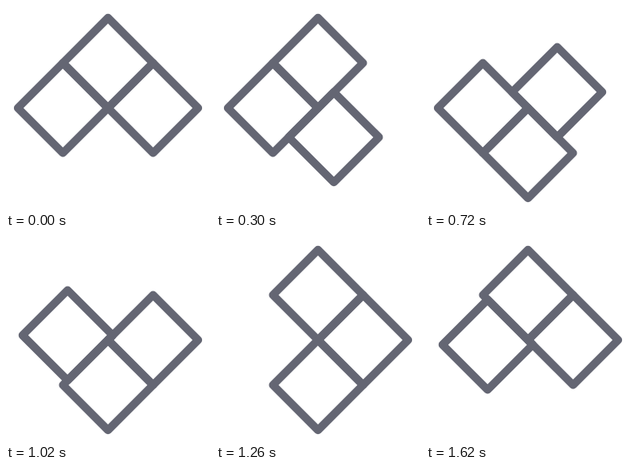
An HTML page that plays this animation: 256x256 px, repeating every 1.68 s.

```html
<!DOCTYPE html>
<html lang="en">
<head>
<meta charset="utf-8">
<title>Sliding squares</title>
<style>
  html, body { margin: 0; width: 100%; height: 100%; overflow: hidden; background: #fff; }
  svg { display: block; width: 100%; height: 100%; }
  rect { fill: none; stroke: #646673; stroke-width: 10; stroke-linejoin: round; }
</style>
</head>
<body>
<svg viewBox="0 0 256 256">
  <g transform="translate(128 128) rotate(45)">
    <rect width="80" height="80"/>
    <rect width="80" height="80"/>
    <rect width="80" height="80"/>
  </g>
</svg>
<script>
const TICK = 60, TICKS_PER_MOVE = 7, REST = 2;
// Top-left corners of the four slots, clockwise from the top one
const slots = [[-80, -80], [0, -80], [0, 0], [-80, 0]];
const rects = document.querySelectorAll('rect');

const ease = u => u * u * (3 - 2 * u);

function place(rect, slot, p) {
  const a = slots[slot % 4], b = slots[(slot + 1) % 4];
  rect.setAttribute('x', a[0] + (b[0] - a[0]) * p);
  rect.setAttribute('y', a[1] + (b[1] - a[1]) * p);
}

function draw(ms) {
  const tick = Math.floor(ms / TICK) % (4 * TICKS_PER_MOVE);
  const move = Math.floor(tick / TICKS_PER_MOVE);
  const u = Math.max(0, tick % TICKS_PER_MOVE - REST) / (TICKS_PER_MOVE - REST);
  // The square just before the gap slides clockwise into it
  const mover = 5 - move;
  place(rects[0], mover + 2, 0);
  place(rects[1], mover + 3, 0);
  place(rects[2], mover, ease(u));
}

function loop() {
  draw(performance.now() - start);
  requestAnimationFrame(loop);
}

const start = performance.now();
loop();
</script>
</body>
</html>
```
